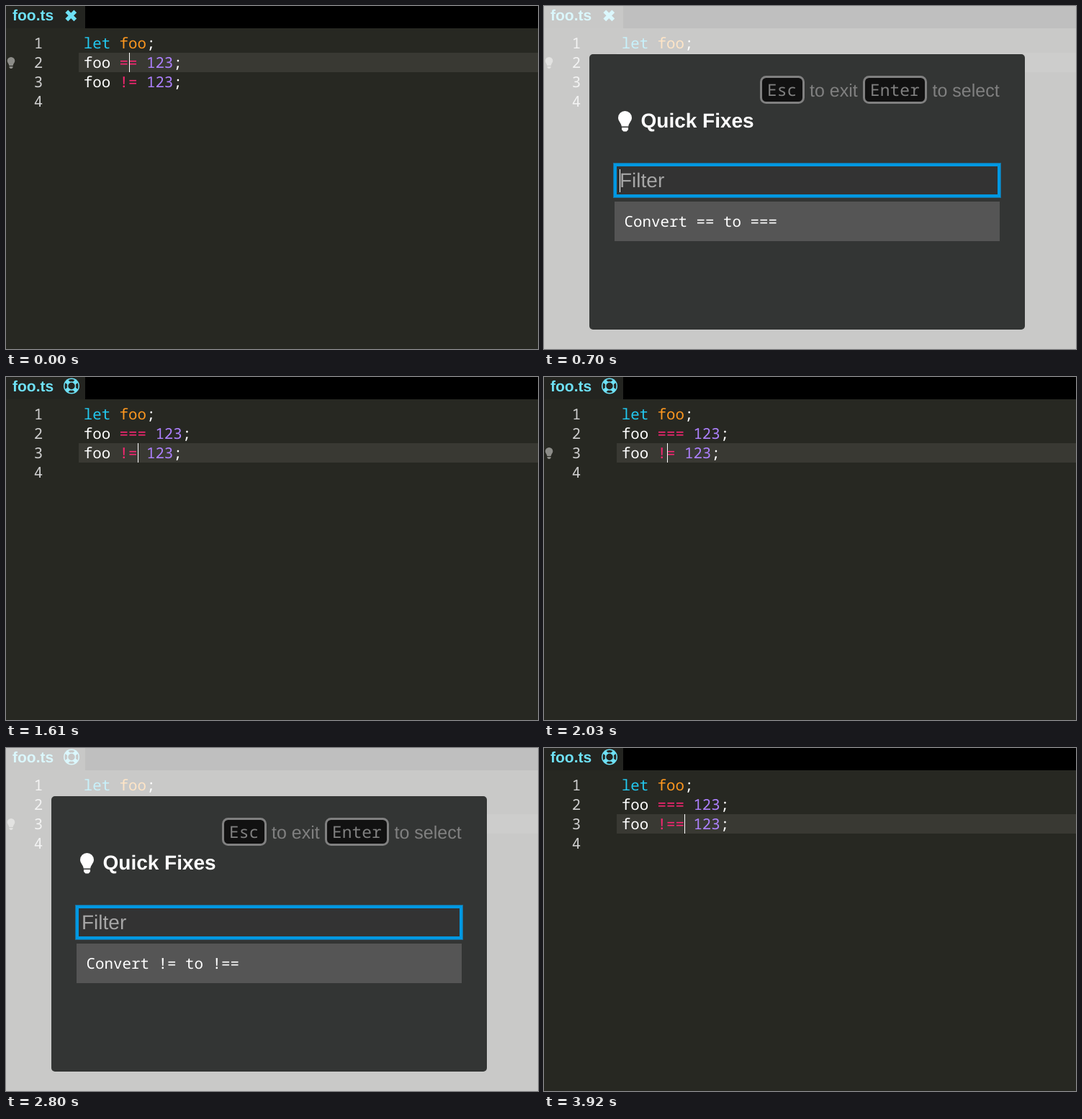
An HTML page for the animation above (4.13 s loop, 739 px wide and 477 px high).

```html
<!DOCTYPE html>
<html lang="en">
<head>
<meta charset="utf-8">
<title>Quick fixes</title>
<style>
  html, body { margin: 0; width: 100%; height: 100%; overflow: hidden; background: #272822; }
  svg { display: block; width: 739px; height: 477px; }
  text { white-space: pre; text-rendering: geometricPrecision; font-family: "Liberation Sans", Arial, sans-serif; }
  .mono { font-family: "Noto Sans Mono", "DejaVu Sans Mono", monospace; font-size: 20.75px; }
  .code { fill: #fff; font-weight: 500; }
  .code tspan { font-weight: 400; }
  .keyword { fill: #22c8f0; }
  .name { fill: #fd971f; }
  .op { fill: #f92672; }
  .num { fill: #ae81ff; }
  .gutter { fill: #d0d0d0; text-anchor: middle; }
  .hint { fill: #808080; font-size: 25px; }
  .key { fill: #111; stroke: #808080; stroke-width: 3; }
  .hint.mono { font-size: 22.9px; }
</style>
</head>
<body>
<svg viewBox="0 0 739 477">
  <defs>
    <path id="bulbShape" d="M9.5 0A9.5 9.5 0 0 1 19 9.5C19 14 14.6 17 14.2 21.5H4.8C4.4 17 0 14 0 9.5A9.5 9.5 0 0 1 9.5 0ZM5 23H14V26L11.5 28.5H7.5L5 26Z"/>
    <path id="notch" d="M-361-678A768 768 0 0 1 361-678L167-484A512 512 0 0 0-167-484Z"/>
  </defs>

  <rect width="739" height="477" fill="#272822"/>
  <rect width="739" height="31"/>
  <rect width="110" height="31" fill="#232420"/>
  <text x="9" y="20" font-size="21" font-weight="700" fill="#6ee0f5">foo.ts</text>
  <path id="closeIcon" d="M84.3 7.3l12 12m0-12l-12 12" stroke="#6ee0f5" stroke-width="5.4"/>
  <g id="dirtyIcon" transform="translate(91 12.5) scale(.01228)" fill="#232420">
    <circle r="896" fill="#6ee0f5"/>
    <circle r="384"/>
    <use href="#notch"/>
    <use href="#notch" transform="rotate(90)"/>
    <use href="#notch" transform="rotate(180)"/>
    <use href="#notch" transform="rotate(270)"/>
  </g>

  <rect id="activeLine" x="101" width="638" height="27" fill="#393933"/>
  <g class="mono gutter">
    <text class="mono" x="45" y="59">1</text>
    <text class="mono" x="45" y="86">2</text>
    <text class="mono" x="45" y="113">3</text>
    <text class="mono" x="45" y="140">4</text>
  </g>
  <text class="mono code" x="107.8" y="59"><tspan class="keyword">let</tspan> <tspan class="name">foo</tspan>;</text>
  <text class="mono code" x="107.8" y="86">foo <tspan class="op" id="equalOp">==</tspan> <tspan class="num">123</tspan>;</text>
  <text class="mono code" x="107.8" y="113">foo <tspan class="op" id="unequalOp">!=</tspan> <tspan class="num">123</tspan>;</text>
  <use id="bulb" href="#bulbShape" fill="#8c8c88"/>
  <rect id="caret" width="1" height="27" fill="#fff"/>

  <g id="dialog">
    <rect width="739" height="477" fill="#fff" fill-opacity=".75"/>
    <rect x="63" y="67" width="605" height="383" rx="5" fill="#333534"/>
    <rect class="key" x="301.5" y="98.5" width="59" height="36" rx="7"/>
    <text class="mono hint" x="310" y="125">Esc</text>
    <text class="hint" x="369" y="125.5">to exit</text>
    <rect class="key" x="444.5" y="98.5" width="86" height="36" rx="7"/>
    <text class="mono hint" x="453" y="125">Enter</text>
    <text class="hint" x="539.5" y="125.5">to select</text>
    <use href="#bulbShape" transform="translate(103 146)" fill="#fff"/>
    <text x="134.5" y="169" font-size="28" font-weight="700" fill="#fff">Quick Fixes</text>
    <rect x="96.5" y="218.5" width="538" height="48" fill="none" stroke="#1b6e98"/>
    <rect x="99" y="221" width="533" height="43" fill="#333" stroke="#0098e2" stroke-width="4"/>
    <text x="105" y="252" font-size="28" fill="#a6a6a6">Filter</text>
    <rect id="filterCaret" x="105" y="227" width="1" height="32" fill="#fff"/>
    <rect x="98" y="272" width="535" height="55" fill="#555"/>
    <text class="mono" id="fix" x="111.5" y="307" font-weight="500" style="font-size:20.85px" fill="#fff"></text>
  </g>
</svg>
<script>
  const LOOP = 4130;
  const CARET_X = { 5: 171, 6: 183, 7: 195 };

  // Each step changes only the listed parts of the state.
  const steps = [
    [0, { line: 2, column: 5, caret: true, bulb: 2, dirty: false, equal: "==", unequal: "!=", fix: "", filterCaret: true }],
    [350, { caret: false }],
    [700, { fix: "Convert == to ===" }],
    [1190, { fix: "", equal: "===", column: 7, caret: true, bulb: 0 }],
    [1260, { dirty: true, bulb: 2 }],
    [1400, { bulb: 0 }],
    [1540, { line: 3 }],
    [1610, { column: 6 }],
    [1820, { column: 5 }],
    [2030, { bulb: 3 }],
    [2310, { fix: "Convert != to !==" }],
    [2800, { filterCaret: false }],
    [3010, { fix: "", unequal: "!==", column: 7 }],
    [3150, { bulb: 0 }],
    [3500, { caret: false }],
    [3920, { caret: true }]
  ];

  const el = id => document.getElementById(id);
  const show = (id, on) => el(id).setAttribute("visibility", on ? "inherit" : "hidden");
  const lineTop = line => 11 + 27 * line;
  let shown = 0;

  function draw(count) {
    const s = Object.assign({}, ...steps.slice(0, count).map(step => step[1]));
    el("equalOp").textContent = s.equal;
    el("unequalOp").textContent = s.unequal;
    el("fix").textContent = s.fix;
    el("activeLine").setAttribute("y", lineTop(s.line));
    el("caret").setAttribute("y", lineTop(s.line));
    el("caret").setAttribute("x", CARET_X[s.column]);
    el("bulb").setAttribute("transform", `translate(1.7 ${lineTop(s.bulb) + 6}) scale(.56)`);
    show("caret", s.caret);
    show("bulb", s.bulb);
    show("closeIcon", !s.dirty);
    show("dirtyIcon", s.dirty);
    show("filterCaret", s.filterCaret);
    show("dialog", s.fix);
  }

  const start = performance.now();
  function tick() {
    const time = (performance.now() - start) % LOOP;
    const count = steps.filter(step => step[0] <= time).length;
    if (count !== shown) draw(shown = count);
    requestAnimationFrame(tick);
  }
  tick();
</script>
</body>
</html>
```
